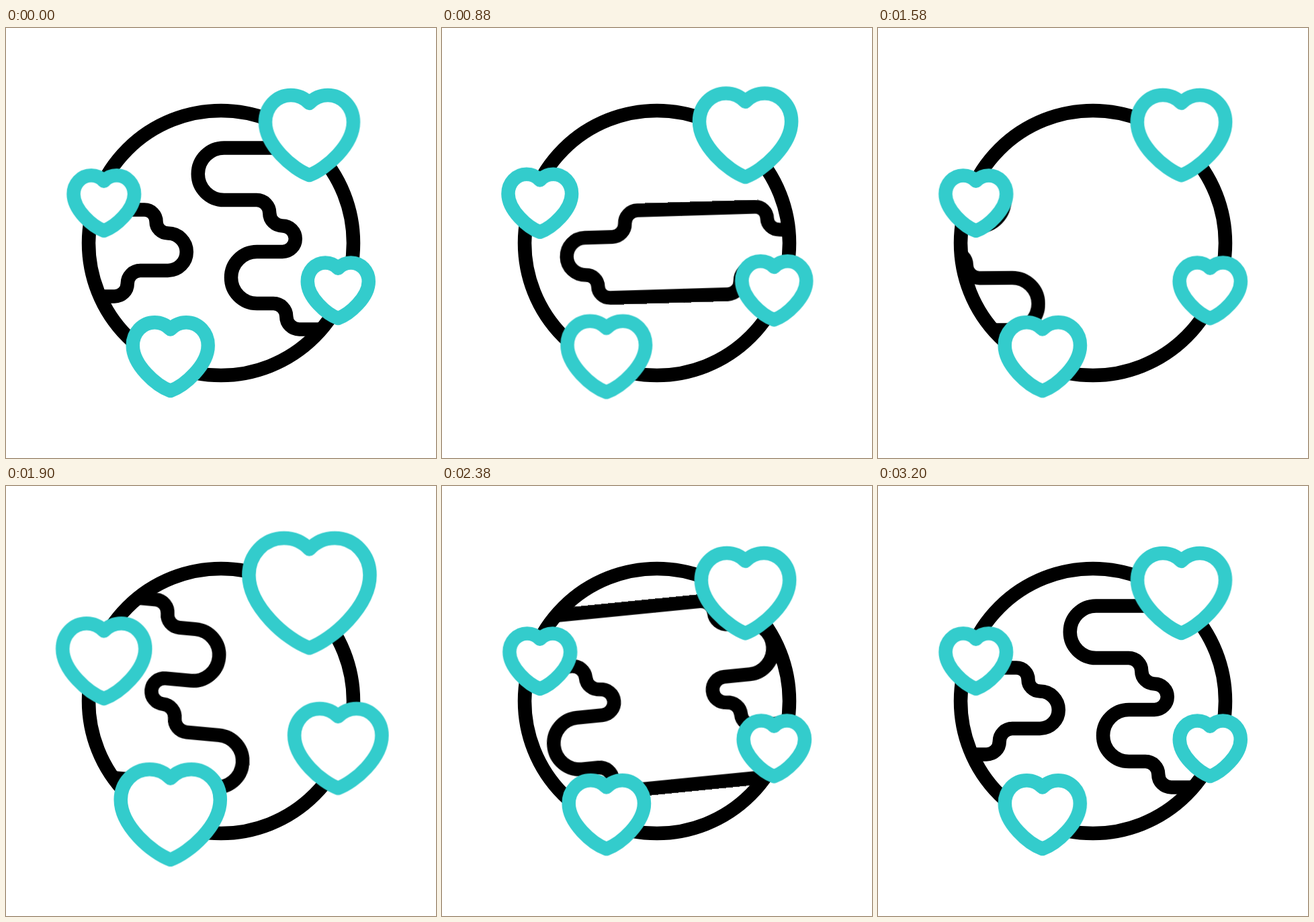
Recreate the animation shown at these times as an HTML page. Size 640 by 640 pixels, loop 3400 ms.

```html
<!DOCTYPE html>
<html lang="en">
<head>
<meta charset="utf-8">
<title>Globe with hearts</title>
<style>
  html, body { margin: 0; width: 100%; height: 100%; overflow: hidden; background: #fff; }
  svg { display: block; width: 100%; height: 100%; }

  .line { fill: none; stroke: #000; stroke-width: 20.5; stroke-linejoin: round; }
  .heart {
    fill: #fff; stroke: #3cc; stroke-width: 20.5; stroke-linejoin: round;
    vector-effect: non-scaling-stroke;
  }

  /* 3200 ms of motion, then a 200 ms rest */
  .swing, .leave, .enter, .heart {
    animation: 3400ms cubic-bezier(.3333, 0, .6667, 1) infinite;
  }
  .swing { transform-origin: 320px 320px; animation-name: swing; }
  .leave { animation-name: leave; }
  .enter { animation-name: enter; }
  .heart { animation-name: beat; }

  @keyframes swing {
    0%, 94.1176%, 100% { transform: rotate(0deg); }
    11.7647%, 58.8235% { transform: rotate(5.74deg); }
    35.2941%, 70.5882% { transform: rotate(-5.74deg); }
  }
  @keyframes leave {
    0% { transform: translateX(0); }
    70.5882%, 100% { transform: translateX(856px); }
  }
  @keyframes enter {
    0%, 23.5294% { transform: translateX(-646px); }
    94.1176%, 100% { transform: translateX(0); }
  }
  @keyframes beat {
    0%, 23.5294%, 47.0588%, 70.5882%, 94.1176%, 100% { transform: scale(var(--lo)); }
    11.7647%, 35.2941%, 58.8235%, 82.3529% { transform: scale(var(--hi)); }
  }
</style>
</head>
<body>
<svg viewBox="0 0 640 640">
  <defs>
    <clipPath id="disc"><circle cx="320" cy="320" r="204"/></clipPath>

    <!-- each continent is one coast plus the same coast turned by 180 degrees -->
    <path id="bigCoast" d="M505 178.5H324.5a38.75 38.75 0 0 0 0 77.5H373
      a19.25 19.25 0 0 1 19.25 19.25a19.25 19.25 0 0 0 19.25 19.25
      a19.25 19.25 0 0 1 0 38.5H373.5a38.5 38.5 0 0 0 0 77H398
      a19.25 19.25 0 0 1 19.25 19.25a19.25 19.25 0 0 0 19.25 19.25H505"/>
    <path id="smallCoast" d="M96 270.5H206a17.5 17.5 0 0 1 17.5 17.5
      a17.5 17.5 0 0 0 17.5 17.5a27.75 27.75 0 0 1 0 55.5H200
      a19.25 19.25 0 0 0 -19.25 19.25a19.25 19.25 0 0 1 -19.25 19.25H96"/>
    <g id="map">
      <use href="#bigCoast"/>
      <use href="#bigCoast" transform="rotate(180 504.5 313.5)"/>
      <use href="#smallCoast"/>
      <use href="#smallCoast" transform="rotate(180 96.25 335)"/>
    </g>
  </defs>

  <g class="line">
    <g clip-path="url(#disc)">
      <g class="swing">
        <g class="leave"><use href="#map"/></g>
        <g class="enter"><use href="#map"/></g>
      </g>
    </g>
    <circle cx="320" cy="320" r="197"/>
  </g>
  <g id="hearts"></g>
</svg>
<script>
  // centre x, centre y, half width at rest, half width at the peak of the beat
  const hearts = [
    [451.5, 160, 65.5, 94.5],
    [145.75, 261, 45.25, 64.5],
    [244.75, 489.5, 56, 77.3],
    [494.25, 391, 45.5, 68.7]
  ];
  const unit = 65.5;
  const shape = "M0-48C7-55.5 16.5-60 27.5-60C49-60 65.5-42 65.5-20C65.5 14 25 50 0 59" +
    "C-25 50-65.5 14-65.5-20C-65.5-42-49-60-27.5-60C-16.5-60-7-55.5 0-48Z";

  document.getElementById("hearts").innerHTML = hearts.map(([x, y, lo, hi]) =>
    `<g transform="translate(${x} ${y})">
      <path class="heart" d="${shape}" style="--lo:${lo / unit};--hi:${hi / unit}"/>
    </g>`).join("");
</script>
</body>
</html>
```
